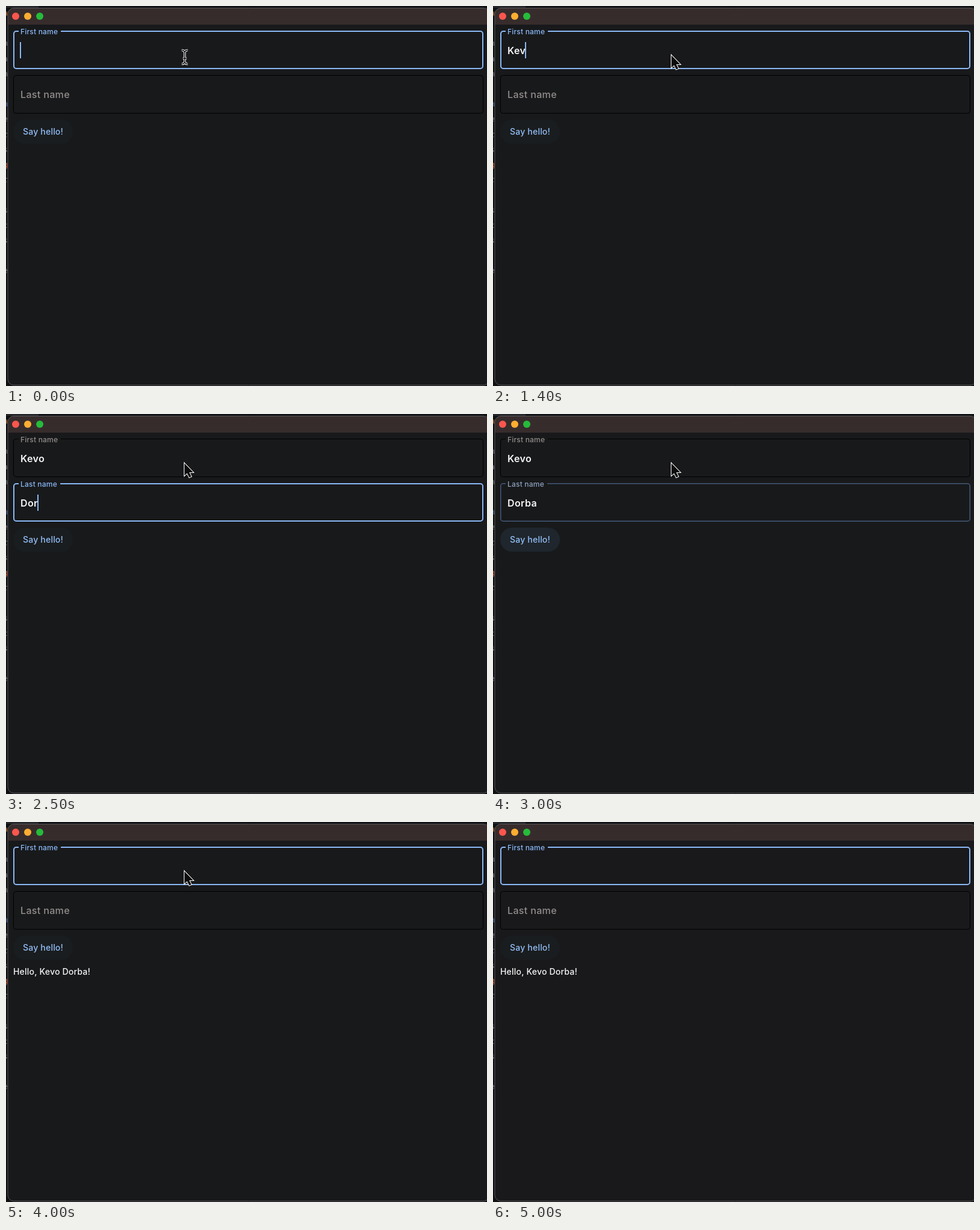
An HTML page with a canvas that plays this animation: 798 px wide and 632 px high, repeating every 5100 ms.

```html
<!DOCTYPE html>
<html lang="en">
<head>
<meta charset="utf-8">
<style>
  html, body { margin: 0; width: 100%; height: 100%; overflow: hidden; background: #101113; }
  canvas { display: block; }
</style>
</head>
<body>
<canvas id="stage" width="798" height="632"></canvas>
<script>
const ctx = document.getElementById("stage").getContext("2d");
const LOOP = 5100, TAB = 1725, TAB_BUTTON = 2950, SUBMIT = 3300, LEAVE = 4900;
const FIRST = "Kevo", LAST = "Dorba";
const FIRST_KEYS = [1000, 1200, 1350, 1550];
const LAST_KEYS = [2200, 2350, 2450, 2600, 2750];
const BLUE = [138, 184, 246], GREY = [146, 141, 139], BLACK = [0, 0, 0];

const ramp = (t, start, length) => Math.min(1, Math.max(0, (t - start) / length));
const lerp = (a, b, p) => a + (b - a) * p;
const mix = (a, b, p) => `rgb(${a.map((v, i) => Math.round(lerp(v, b[i], p)))})`;
const typed = (word, keys, t) => word.slice(0, keys.filter(k => k <= t).length);

function text(string, x, y, size, color, spacing = 0.2, weight = 500) {
  ctx.font = `${weight} ${size}px Inter, sans-serif`;
  ctx.letterSpacing = spacing + "px";
  ctx.fillStyle = color;
  ctx.fillText(string, x, y);
}

function roundRect(x, y, w, h, r) {
  ctx.beginPath();
  ctx.roundRect(x, y, w, h, r);
}

function dot(x, color) {
  ctx.beginPath();
  ctx.arc(x, 17, 6, 0, 7);
  ctx.fillStyle = color;
  ctx.fill();
}

function drawBackdrop() {
  ctx.fillStyle = "#101113";
  ctx.fillRect(0, 0, 798, 632);
  ctx.fillStyle = "#25262a";
  ctx.fillRect(0, 0, 54, 3);
  ctx.font = "13px 'Noto Sans Mono', monospace";
  ctx.letterSpacing = "0px";
  ctx.textAlign = "right";
  [..."a nan nersgr scs.e"].forEach((letter, i) => {
    ctx.fillStyle = { 0: "#b8692e", 6: "#4c6ea8", 10: "#c4532f" }[i] || "#707176";
    ctx.fillText(letter, 3, 16 + i * 25.2);
  });
  ctx.textAlign = "left";
}

function drawWindow(surface) {
  roundRect(3, 3.5, 799, 627, 10);
  ctx.fillStyle = surface;
  ctx.fill();
  ctx.save();
  ctx.clip();
  ctx.fillStyle = "#372c2c";
  ctx.fillRect(0, 0, 802, 31);
  ctx.restore();
  ctx.strokeStyle = "#57575a";
  ctx.lineWidth = 1;
  ctx.stroke();
  dot(16, "#fb564e");
  dot(36, "#fdae31");
  dot(56, "#26bb3b");
}

function drawField({ label, top, value, focus, floated, caret, notch }, surface) {
  const width = lerp(1, 2, focus);
  roundRect(12 + width / 2, top + width / 2, 780 - width, 64 - width, 4);
  ctx.strokeStyle = mix(BLACK, BLUE, focus);
  ctx.lineWidth = width;
  ctx.stroke();
  ctx.fillStyle = surface;
  ctx.fillRect(21, top - 1, notch * floated, 4);
  text(label, 24, top + lerp(38, 6, floated), lerp(16, 12, floated),
       mix(GREY, BLUE, focus), lerp(0.35, 0.2, floated));
  text(value, 24, top + 39, 16, "#f6f6f6", 0.35, 600);
  if (caret) {
    const x = value ? 24 + ctx.measureText(value).width - 1 : 23;
    ctx.fillStyle = "#8ab8f6";
    ctx.fillRect(Math.round(x), top + 19, 2, 27);
  }
}

function drawButton(focus) {
  roundRect(12, 189, 99, 40, 20);
  ctx.fillStyle = mix([26, 29, 31], [36, 46, 58], focus);
  ctx.fill();
  text("Say hello!", 28, 214, 14, "#92bff8");
}

function drawPointer(isBeam) {
  const shape = new Path2D(isBeam
    ? "M291.5 73.5Q296.5 73.5 296.5 78V92Q296.5 96.5 291.5 96.5M301.5 73.5Q296.5 73.5 296.5 78V92Q296.5 96.5 301.5 96.5M293.5 87H299.5"
    : "M296 82V102.5L300.5 98.5L304 105.5L307.5 104L304 97H310.5Z");
  ctx.strokeStyle = "#fff";
  ctx.lineWidth = isBeam ? 3.6 : 2;
  ctx.stroke(shape);
  if (isBeam) {
    ctx.strokeStyle = "#000";
    ctx.lineWidth = 1.4;
    ctx.stroke(shape);
  } else {
    ctx.fillStyle = "#0c0c0d";
    ctx.fill(shape);
  }
}

function draw(t) {
  const surface = t < LEAVE ? "#18191b" : "#19191c";
  const submitted = t >= SUBMIT;
  const inFirst = t < TAB || submitted, inLast = t >= TAB && t < TAB_BUTTON;
  // Every key press or focus change restarts the caret blink.
  const resets = [0, ...FIRST_KEYS, TAB, ...LAST_KEYS, SUBMIT].filter(k => k <= t);
  const caretOn = (t - resets.at(-1)) % 1000 < 500;

  drawBackdrop();
  drawWindow(surface);
  drawField({
    label: "First name", top: 41, notch: 70, floated: 1,
    value: submitted ? "" : typed(FIRST, FIRST_KEYS, t),
    focus: 1 - ramp(t, TAB, 100) + ramp(t, SUBMIT, 115),
    caret: inFirst && caretOn
  }, surface);
  drawField({
    label: "Last name", top: 115, notch: 69,
    value: submitted ? "" : typed(LAST, LAST_KEYS, t),
    focus: ramp(t, TAB, 100) - ramp(t, TAB_BUTTON, 100),
    floated: ramp(t, TAB, 150) - ramp(t, SUBMIT, 150),
    caret: inLast && caretOn
  }, surface);
  drawButton(ramp(t, TAB_BUTTON, 100) - ramp(t, 3400, 200));
  if (submitted) text(`Hello, ${FIRST} ${LAST}!`, 12, 254, 14, "#f6f6f6");
  if (t < LEAVE) drawPointer(t < FIRST_KEYS[0]);
}

const start = performance.now();
function tick() {
  draw((performance.now() - start) % LOOP);
  requestAnimationFrame(tick);
}
tick();
</script>
</body>
</html>
```
